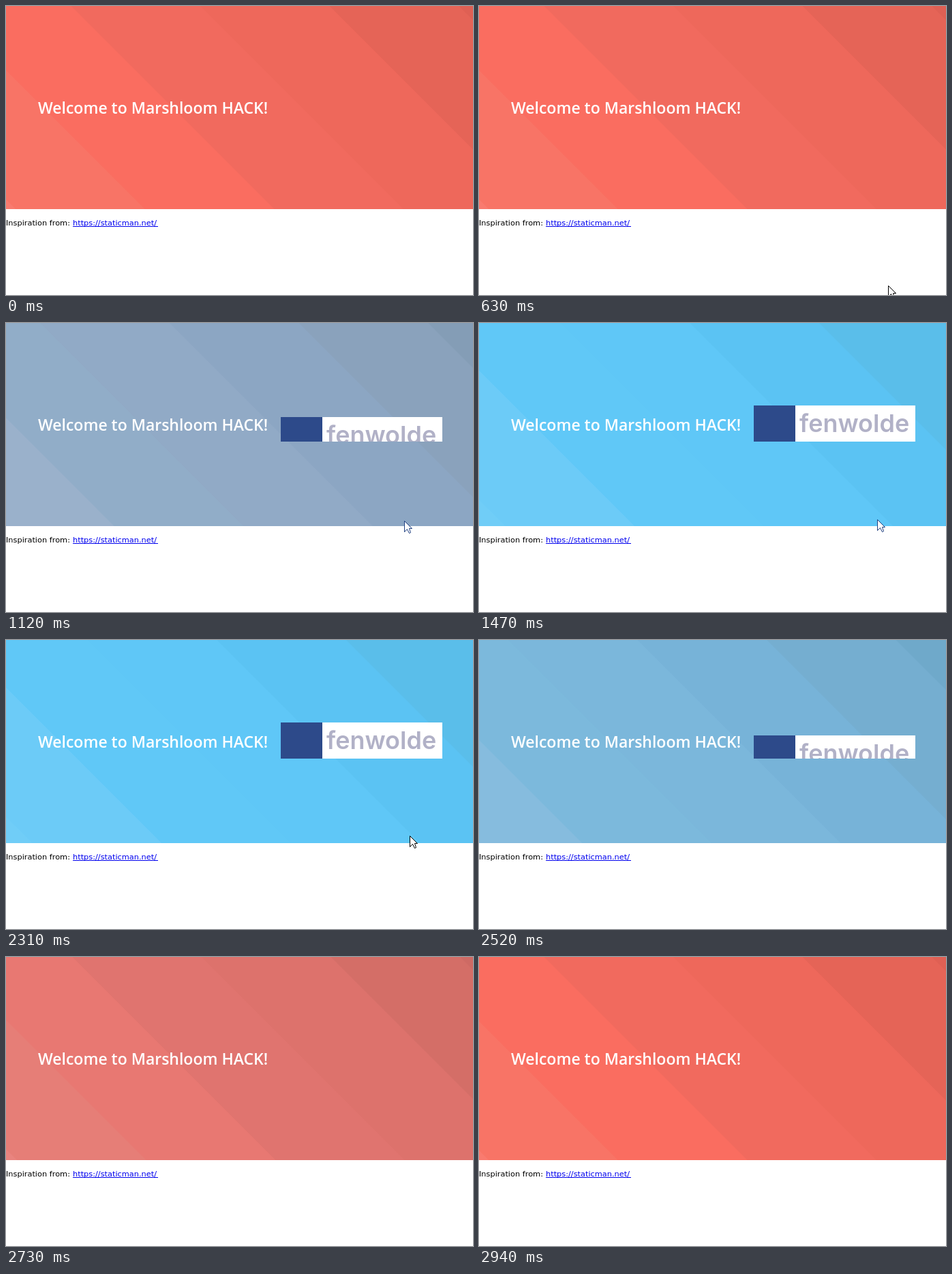
These frames come from a looping animation (685 by 424 pixels, 4.34 s). An HTML page with a canvas:

```html
<!DOCTYPE html>
<html lang="en">
<head>
<meta charset="utf-8">
<style>
  html, body { margin: 0; overflow: hidden; background: #fff; }
  canvas { display: block; }
</style>
</head>
<body>
<canvas id="stage" width="685" height="424"></canvas>
<script>
const ctx = document.getElementById('stage').getContext('2d', { alpha: false });
const LOOP = 4340, STEP = 70, PANEL = 298;
const ENTER = 1000, LEAVE = 2465, FADE = 300;

// Diagonal bands from bottom left to top right, at rest and hovered
const rest = [0xfa8478, 0xf97b6f, 0xf87466, 0xfa6d60, 0xf16a5e, 0xee685b, 0xe56457, 0xdf6054];
const hover = [0x70cdf7, 0x6ccbf7, 0x60c8f7, 0x5fc7f7, 0x5bc3f3, 0x5abeea, 0x55b8e4, 0x50b3df];

const progress = (t, start, length) => Math.min(1, Math.max(0, (t - start) / length));
const easeOut = x => 1 - (1 - x) ** 2.2;

function mix(a, b, k) {
  const channel = s => Math.round((a >> s & 255) * (1 - k) + (b >> s & 255) * k);
  return `rgb(${channel(16)},${channel(8)},${channel(0)})`;
}

function text(str, x, y, font, color) {
  ctx.font = font;
  ctx.fillStyle = color;
  ctx.fillText(str, x, y);
}

function rect(x, y, w, h, color) {
  ctx.fillStyle = color;
  ctx.fillRect(x, y, w, h);
}

function polygon(points, color) {
  ctx.beginPath();
  points.forEach(([x, y]) => ctx.lineTo(x, y));
  ctx.closePath();
  ctx.fillStyle = color;
  ctx.fill();
}

function drawPanel(shift, tint) {
  rest.forEach((color, i) => {
    const x = i ? -663 + 189.6 * i + shift : -400;
    polygon([[x, 0], [x + PANEL, PANEL], [1200, PANEL], [1200, 0]], mix(color, hover[i], tint));
  });
  text('Welcome to Marshloom HACK!', 47, 158, '600 23px "Open Sans", sans-serif', '#fff');
}

function drawBadge(shown) {
  if (!shown) return;
  ctx.save();
  ctx.beginPath();
  ctx.rect(403, 121, 237, 53);
  ctx.clip();
  ctx.translate(403, 121 + Math.round(53 * (1 - shown)));
  rect(0, 0, 61, 53, '#2d4a8a');
  rect(61, 0, 176, 53, '#fff');
  text('fenwolde', 67, 39, '600 36px Inter, sans-serif', '#b1b1c7');
  ctx.restore();
}

function drawFooter() {
  const font = '11.35px "DejaVu Sans", sans-serif';
  text('Inspiration from:', 0, 322, font, '#000');
  text('https://staticman.net/', 98, 322, font, '#00e');
  rect(98, 323, 125, 1, '#00e');
}

function drawCursor(t) {
  if (t < 630 || t > 2500) return;
  const rise = (1 - progress(t, 630, 490)) ** 2;
  const settle = progress(t, 1120, 140);
  const exit = Math.max(0, (t - 2240) / STEP);
  ctx.save();
  ctx.translate(Math.round(584 + 16 * rise + 8 * exit ** 2.3) + .5,
                Math.round(290 + 120 * rise - 2 * settle - exit ** 2) + .5);
  polygon([[0, 0], [0, 16], [4, 12], [7, 18], [9, 17], [7, 11], [11, 11]], '#fff');
  ctx.lineWidth = 1;
  ctx.strokeStyle = mix(0x000000, 0x1f3f80, t > 1050 && !exit ? 1 : 0);
  ctx.stroke();
  ctx.restore();
}

function draw(now) {
  const t = Math.floor(now % LOOP / STEP) * STEP;
  const entered = easeOut(progress(t, ENTER, FADE));
  const left = progress(t, LEAVE, FADE);
  const shown = entered * (1 - easeOut(left));
  rect(0, 0, 685, 424, '#fff');
  drawPanel(214 * shown, entered * (1 - left));
  drawBadge(shown);
  drawFooter();
  drawCursor(t);
}

const start = performance.now();
function frame() {
  draw(performance.now() - start);
  requestAnimationFrame(frame);
}
frame();
</script>
</body>
</html>
```
